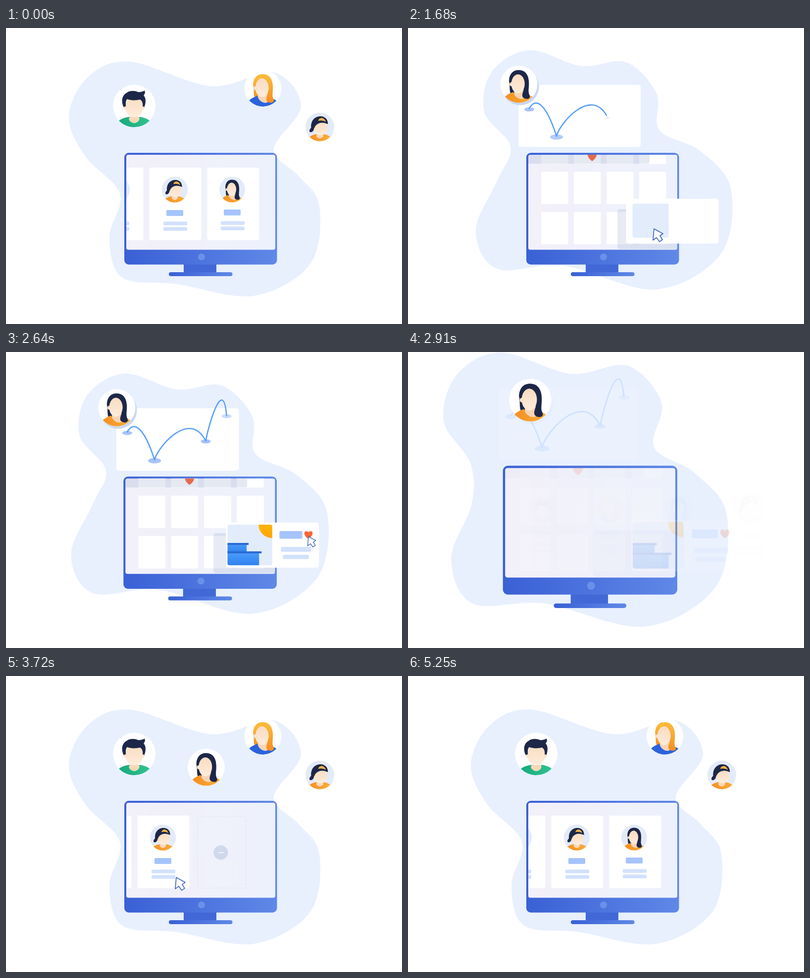
Recreate the animation shown at these times as an HTML page. Size 800 by 600 pixels, loop 5640 ms.

```html
<!DOCTYPE html>
<html lang="en">
<head>
<meta charset="utf-8">
<title>Team board</title>
<style>
  html, body { margin: 0; width: 100%; height: 100%; overflow: hidden; background: #fff; }
  svg { display: block; width: 800px; height: 600px; }
</style>
</head>
<body>
<svg id="stage" viewBox="0 0 800 600"></svg>
<script>
const LOOP = 5640;
const stage = document.getElementById('stage');

// A few key points per outline, in the same order so they can be blended.
const TEAM_BLOB = [[250,68],[165,100],[127,180],[160,260],[230,336],[209,425],[235,506],[345,519],
  [500,543],[615,478],[633,360],[590,299],[541,246],[596,158],[540,90],[415,118]];
const SHOP_BLOB = [[245,45],[170,88],[154,170],[207,240],[180,310],[137,410],[180,488],[315,482],
  [500,530],[632,458],[652,325],[590,249],[508,207],[502,132],[440,69],[350,77]];

// Markup helpers
const rect = (x, y, w, h, fill, r = 0, more = '') =>
  `<rect x="${x}" y="${y}" width="${w}" height="${h}" rx="${r}" fill="${fill}" ${more}/>`;
const path = (d, fill, more = '') => `<path d="${d}" fill="${fill}" ${more}/>`;
const dot = (x, y, r, fill, more = '') => `<circle cx="${x}" cy="${y}" r="${r}" fill="${fill}" ${more}/>`;
const grad = (id, a, b, dir = 'x2="0" y2="1"') =>
  `<linearGradient id="${id}" ${dir}><stop stop-color="${a}"/><stop offset="1" stop-color="${b}"/></linearGradient>`;
const person = (id, art) => `<g id="${id}" clip-path="url(#round)">${art}</g>`;

const NAVY = '#1d2748', PALE = '#e3ebfa', BAR = '#a5c4fb', LINE = '#d2e1fc', SKIN = '#fbe3cb';
const HEART = 'M0 9C-5 5-9 1-9-4C-9-9-3-10 0-6C3-10 9-9 9-4C9 1 5 5 0 9Z';
const NECK = path('M-8 13V23C-14 25-9 34 0 35C9 34 14 25 8 23V13Z', '#f8d7b8');
const shirt = fill => path('M-45 50C-37 30-25 24-9 22C-8 35 9 35 10 22C26 24 37 30 45 50Z', fill);
const face = (x, y, rx, ry) => `<ellipse cx="${x}" cy="${y}" rx="${rx}" ry="${ry}" fill="url(#skin)"/>`;

const longHair = (hair, top) =>
  path('M-23-8C-22-24-14-33-1-33C14-33 22-24 22-6C21 8 22 14 18 24L-18 24C-23 16-20 4-23-8Z', hair) +
  path('M-45 50C-38 31-28 23-13 18C-6 34 6 36 14 24C30 24 38 32 45 50Z', top) +
  path('M-11 10V19C-14 24 0 39 11 33V10Z', '#f6d5b5') +
  face(-2, -1, 15.5, 22) + dot(-17, 0, 4.5, SKIN) +
  path('M-19-6C-15-18-8-23-2-25C10-23 16-14 14 2C13 13 4 25 10 31C17 37 28 34 25 26C19 16 26 4 22-14C18-36-16-38-22-14Z', hair);

const man = shirt('url(#green)') + NECK + face(0, 2, 18, 21) +
  path('M-20 4C-26-4-27-20-16-26C-8-33 4-30 8-28C13-28 17-29 21-31C23-27 21-24 19-21C25-16 23-4 20 4L17 2C18-6 16-10 12-13C4-11-8-11-14-14C-18-10-17-4-17 2Z', NAVY) +
  dot(-18, 4, 3, SKIN) + dot(18, 4, 3, SKIN);

const capBoy = shirt('url(#orange)') + NECK + face(2, 4, 20, 21) +
  path('M-21 0C-18-14-14-6-13 8C-18 9-21 6-21 0Z', '#f3a536') + dot(-15, 7, 4, SKIN) +
  path('M-26 3C-28-20-14-32 2-32C16-32 25-22 24-8C8-16-8-14-17 3C-18 11-22 16-28 16C-33 15-32 8-26 3Z', NAVY) +
  path('M-5-18C-2-30 14-30 18-15C10-20 2-20-5-18Z', '#f8b545');

const fringe = path('M-20 22C-24-6-22-33 0-33C22-33 24-6 20 22Z', NAVY) + shirt('#2f66dc') + NECK + face(0, 2, 17, 21) +
  path('M-20 22C-26-4-22-33 0-33C22-33 26-4 22 20C15 14 19-2 16-8C10-8 5-13 3-18C0-10-8-7-16-6C-18 4-15 14-20 22Z', NAVY);

const bars = rect(-18, 369, 34, 12, BAR, 2) + [392.5, 403.5].map(y => rect(-24, y, 48, 7.5, LINE, 2)).join('');
const sheet = rect(-52.5, 283, 105, 147, '#fff', 4);
const portrait = id => `<g transform="translate(-1 327.5) scale(.61)">${dot(0, 0, 43, PALE)}<use href="#${id}"/></g>`;
const cards = ['man', 'blonde', 'fringe', 'cap'].map((id, i) => `<g id="card${i}">${sheet}${portrait(id)}${bars}</g>`).join('') +
  `<g id="card4">
    <g id="slot">${rect(-48, 285, 98, 145, 'none', 3, 'stroke="#d9dfef" stroke-dasharray="3 3"')}
      ${dot(-1, 358, 14.5, '#d0d8ec')}<path d="M-7 358H5" stroke="#f1f3fb" stroke-width="2"/></g>
    <g id="filled">${sheet}<g id="info" transform="translate(-1 -1)">${bars}</g></g>
  </g>`;

let tiles = '';
for (let row = 0; row < 3; row++)
  for (let col = 0; col < 4; col++) tiles += rect(268 + 66 * col, 309 + 81.5 * row, 54.5, 65.5, '#fff', 2);

const curves = ['M245 163C256 143 276 145 300 219', 'M300 219C308 190 372 118 403 181', 'M403 181C409 148 438 48 445 130'];
const spots = [[245, 165, 10], [300, 221, 13], [403, 182, 10], [445, 131, 10]];
const head = (id, bg) => `<g id="h-${id}">${dot(0, 0, 43, bg)}<use href="#${id}"/></g>`;

stage.innerHTML = `
<defs>
  ${grad('skin', '#f9dcc0', '#fdecdb')}${grad('green', '#12a578', '#35c793', '')}
  ${grad('orange', '#f58a1d', '#fbb23c', '')}${grad('gold', '#fdbc3a', '#f58f22')}
  ${grad('frame', '#3a60d5', '#5f88e7', '')}${grad('screenFill', '#f2f0f9', '#edf1fc', '')}
  ${grad('block', '#4a9bfa', '#2f80ee')}${grad('sun', '#ffc20a', '#ffa505')}
  <clipPath id="round"><circle r="43"/></clipPath>
  <clipPath id="screen">${rect(243, 257, 301, 192, '#000', 3)}</clipPath>
  <clipPath id="leftEdge">${rect(243, 200, 700, 300, '#000')}</clipPath>
  <clipPath id="picClip"><rect id="picBox" rx="4"/></clipPath>
  ${person('man', man)}${person('woman', longHair(NAVY, 'url(#orange)'))}
  ${person('blonde', longHair('url(#gold)', '#2b63dd'))}${person('cap', capBoy)}${person('fringe', fringe)}
</defs>
<path id="blob" fill="#e8f0fe"/>
<g id="monitor">
  ${rect(359, 478, 66, 19, '#4168d6')}${rect(329, 495, 128.5, 8, 'url(#frame)', 4)}
  ${rect(239, 253, 308.5, 226.5, 'url(#frame)', 9)}${rect(243, 257, 301, 192.5, 'url(#screenFill)', 4)}
  ${dot(395, 464, 7, '#6b90ea')}
  <g id="shop" clip-path="url(#screen)">
    <g id="feed">${rect(308, 264, 171, 32, '#fff', 2)}${tiles}
      <g fill="none" stroke="#fdb614" stroke-width="3" stroke-linecap="round"><circle cx="327" cy="280" r="8.5"/><path d="M333 286L336 289"/></g>
      <g id="like">${path(HEART, '#ff6333')}</g></g>
    <path id="shade" d="M243 257H488V270Q488 275 483 275H243Z" fill="#7888b8"/>
    <rect id="popShade" rx="5" fill="#7888b8"/>
  </g>
  <g clip-path="url(#leftEdge)"><g id="cards">${cards}</g></g>
</g>
<g id="upper">
  <g id="chart">${rect(223, 115, 247, 126, '#fff', 5)}
    ${spots.map((s, i) => `<ellipse id="spot${i}" rx="${s[2]}" ry="${s[2] * .41}" fill="#a6c3f8"/>`).join('')}
    ${curves.map((d, i) => path(d, 'none', `id="curve${i}" pathLength="1" stroke-dasharray="1 1" stroke="#5a9ffa" stroke-width="2.6" stroke-linecap="round"`)).join('')}
  </g>
  ${head('man', '#fff')}${head('blonde', '#fff')}${head('cap', PALE)}
  <circle id="headShade" r="37.5" fill="#cbd7f1"/>
  <g id="h-woman"><circle id="womanBg" r="43"/><use href="#woman"/></g>
</g>
<g id="popup">
  <rect id="popBox" rx="5" fill="#fff"/>
  <g clip-path="url(#picClip)">
    <rect x="430" y="340" width="120" height="110" fill="#e2ecfb"/>
    ${dot(533, 350, 27, 'url(#sun)', 'id="sunDisc"')}
    <g id="blocks">${rect(443, 389, 39, 18, 'url(#block)')}${rect(443, 387, 43, 4, '#2c69d3')}
    ${rect(443, 407, 64, 26, 'url(#block)')}${rect(443, 404, 69, 4, '#2c69d3')}</g>
  </g>
  <g id="popInfo">${rect(548, 363, 46, 15.5, BAR, 2)}${rect(551, 395, 61, 10, LINE, 2)}${rect(555, 411, 52, 8.5, LINE, 2)}</g>
  <g id="popLike">${path(HEART, '#ff6333')}</g>
</g>
<path id="cursor" d="M0 0L18 10L12 14L17 22L11 26L5 18L-2 23Z" fill="#fff" stroke="#3c62bd" stroke-width="1.7" stroke-linejoin="round"/>`;

const el = {};
stage.querySelectorAll('[id]').forEach(e => el[e.id] = e);

// Timing helpers
const clamp = v => Math.min(1, Math.max(0, v));
const lerp = (a, b, p) => a + (b - a) * p;
const mix = (a, b, p) => a.map((v, i) => lerp(v, b[i], p));
const lin = (t, a, b) => clamp((t - a) / (b - a));
const ease = (t, a, b) => { const p = lin(t, a, b); return p * p * (3 - 2 * p); };
const pulse = (t, a, b, c, d) => ease(t, a, b) * (1 - ease(t, c, d));
const place = (e, x, y, s = 1) => e.setAttribute('transform', `translate(${x} ${y}) scale(${s})`);
const frame = (e, m) => e.setAttribute('transform', `matrix(${m[0]} 0 0 ${m[1]} ${m[2]} ${m[3]})`);
const fade = (e, v) => e.setAttribute('opacity', v);
const box = (e, b) => ['x', 'y', 'width', 'height'].forEach((n, i) => e.setAttribute(n, b[i]));

// Each stop is [arrival, x, y]; the move there takes at most 400 ms.
const visit = (t, stops) => stops.slice(1).reduce((pos, [at, ...to], i) =>
  mix(pos, to, ease(t, Math.max(stops[i][0], at - 400), at)), stops[0].slice(1));

function smooth(pts) {
  const n = pts.length, at = i => pts[(i + n) % n];
  let d = `M${pts[0]}`;
  for (let i = 0; i < n; i++) {
    const [a, b, c, e] = [at(i - 1), at(i), at(i + 1), at(i + 2)];
    d += `C${b.map((v, k) => v + (c[k] - a[k]) / 6)} ${c.map((v, k) => v - (e[k] - b[k]) / 6)} ${c}`;
  }
  return d + 'Z';
}

const POINTER = [[840, 371, 358], [925, 383, 421], [1500, 497, 407], [2350, 611, 374], [3120, 442, 415], [3640, 342, 415], [4080, 408, 188]];
const IN_CARD = [457, 327.5, 26], ON_CHART = [224, 114, 37.5], IN_SKY = [404.5, 185, 37.5];

function draw(t) {
  const early = t < 1500;
  const b = early ? ease(t, 30, 560) : 1 - ease(t, 2830, 3050);

  // Camera: the shop zooms in on leaving, the team scene settles on arrival.
  const q = t < 3100 ? lin(t, 2500, 2950) : 0;
  const u = t > 2500 ? 4.13 * (1 - lin(t, 2850, 3500)) ** 2 : 0;
  const s = 1 + .4 * q ** 4;
  const layer = (near, far = -7, lift = 0) => mix(
    [1 - .049 * u, 1 - .038 * u, (14.2 + far) * u, (13.6 - lift) * u],
    [s, s, 430 * (1 - s) + near * q * q, 380 * (1 - s)], b);

  el.blob.setAttribute('d', smooth(TEAM_BLOB.map((p, i) => mix(p, SHOP_BLOB[i], b))));
  frame(el.blob, layer(-45, 0));
  frame(el.monitor, layer(-10, -7, 2));
  frame(el.upper, layer(6));
  frame(el.popup, layer(40));

  // Shop page
  const leave = 1 - ease(t, 2800, 2950), scroll = ease(t, 1000, 1350);
  fade(el.shop, ease(t, 350, 560) * leave);
  place(el.feed, scroll, -99 * scroll);
  place(el.like, 371, 360, ease(t, 790, 890));
  fade(el.shade, .19 * ease(t, 500, 700));

  // Chart
  const chart = ease(t, 450, 680), k = lerp(.6, 1, chart);
  place(el.chart, 346 * (1 - k), 178 * (1 - k), k);
  fade(el.chart, chart * leave);
  curves.forEach((_, i) => {
    const a = 680 + 760 * i, p = ease(t, a, a + 270), c = el['curve' + i];
    c.setAttribute('stroke-dashoffset', 1 - p);
    c.setAttribute('visibility', p > 0 ? 'visible' : 'hidden');
  });
  spots.forEach(([x, y], i) => {
    const a = 140 + 760 * i;
    place(el['spot' + i], x, y, ease(t, a, a + 60));
    fade(el['spot' + i], lerp(.6, 1, ease(t, a + 600, a + 900)));
  });

  // Tile that lifts off the screen
  const open = ease(t, 1480, 1670), fill = ease(t, 1690, 1930);
  box(el.popBox, mix([467, 373, 54, 65], [440.5, 346, 187, 91], open));
  box(el.popShade, mix([467, 373, 54, 65], [423 - 30 * q * q, 367, 165, 81], open));
  fade(el.popShade, .17 * open);
  fade(el.popup, t > 1480 ? leave : 0);
  box(el.picBox, mix(mix([467, 373, 54, 65], [453.5, 356, 73, 69], open), [443.5, 350, 90, 82], fill));
  place(el.blocks, 0, 60 * (1 - ease(t, 1800, 2100)));
  el.sunDisc.setAttribute('r', 27 * ease(t, 1900, 2150));
  const info = ease(t, 1950, 2200);
  place(el.popInfo, -14 * (1 - info), 0);
  fade(el.popInfo, info);
  place(el.popLike, 606.5, 371, .92 * ease(t, 2380, 2500));

  // Profile cards
  fade(el.cards, early ? 1 - ease(t, 30, 300) : ease(t, 2900, 3080));
  const x0 = early ? -9 : 310 - 343 * ease(t, 3190, 3660) + 24 * ease(t, 3760, 3980);
  for (let i = 0; i < 5; i++) {
    const size = 1 - u * (.028 - .014 * i);
    place(el['card' + i], x0 + 117 * i + .5 * i * i * u, 356 * (1 - size), size);
  }
  const dropped = early ? 1 : ease(t, 4560, 4720);
  fade(el.slot, (1 - dropped) * ease(t, 3400, 3600));
  fade(el.filled, dropped);
  fade(el.info, early ? 1 : ease(t, 4800, 5150));

  // Heads
  const pop = early ? 1 - ease(t, 30, 330) : ease(t, 2930, 3110);
  place(el['h-man'], 259, 158, pop);
  place(el['h-blonde'], 519, 122, pop * .865);
  place(el['h-cap'], 634, 200.5, pop * .675);
  const [wx, wy, wr] = mix(early ? IN_CARD : mix(IN_SKY, IN_CARD, ease(t, 4150, 4650)), ON_CHART, b);
  place(el['h-woman'], wx, wy, wr / 43);
  el.womanBg.setAttribute('fill', wr < 30 ? PALE : '#fff');
  place(el.headShade, wx + 3, wy + 5);
  fade(el.headShade, ease(t, 480, 620) * leave);

  // Pointer: it carries the woman's portrait to the free slot.
  const [px, py] = t < 4150 ? visit(t, POINTER) : [wx + 3.5, wy + 3];
  const away = ease(t, 4700, 4980);
  place(el.cursor, px + 40 * away, py + 100 * away, 1 - .18 * pulse(t, 2400, 2500, 2700, 2800));
  fade(el.cursor, t < 3000 ? pulse(t, 640, 740, 2780, 2900) : pulse(t, 3060, 3150, 4780, 4980));
}

const start = performance.now();
function tick() {
  draw((performance.now() - start) % LOOP);
  requestAnimationFrame(tick);
}
tick();
</script>
</body>
</html>
```
